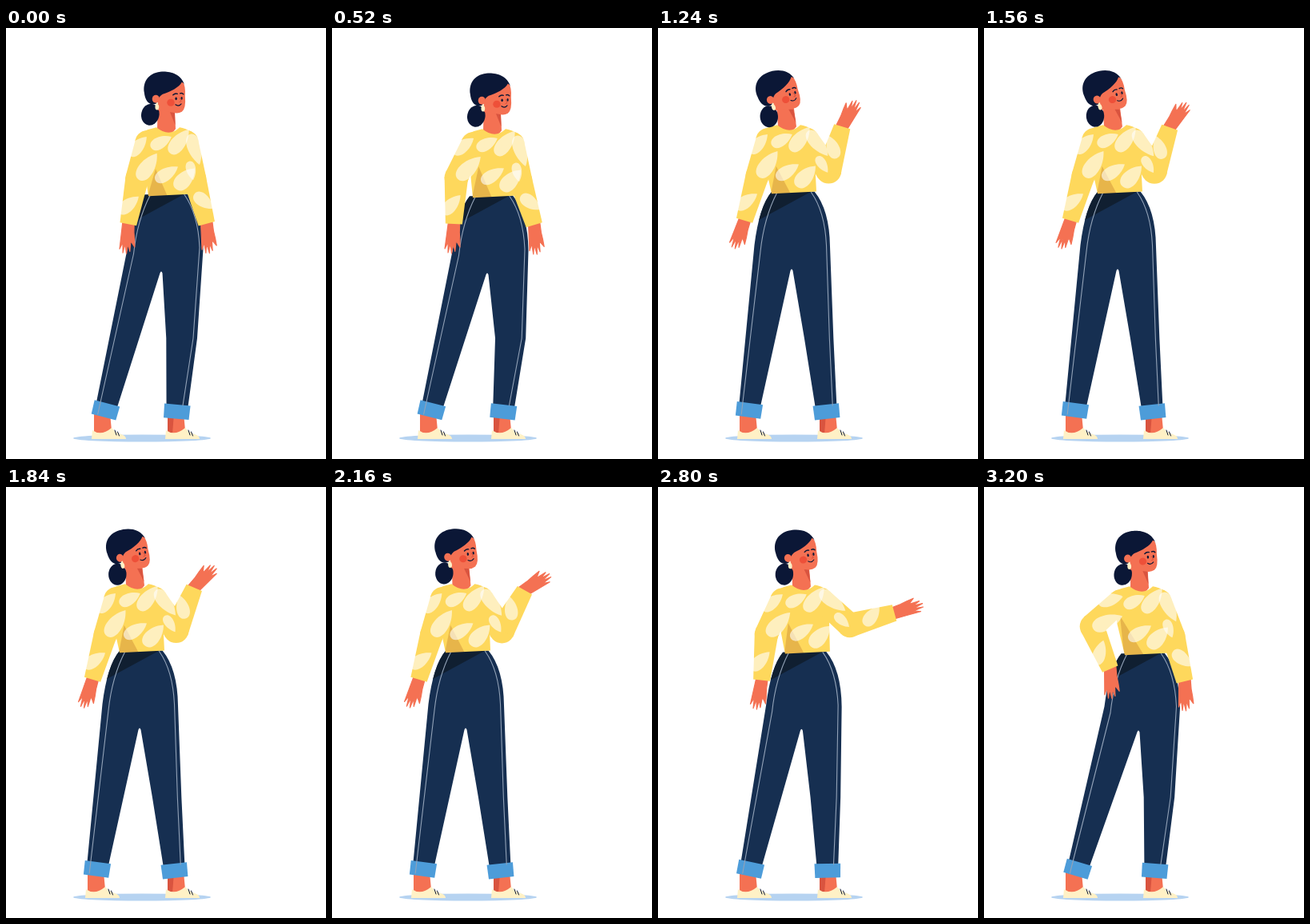
Write an HTML page with a canvas that moves like this. It is 400 by 539 pixels and loops after 3.32 s.

```html
<!DOCTYPE html>
<html lang="en">
<head>
<meta charset="utf-8">
<title>Waving woman</title>
<style>
  html, body { margin: 0; width: 100%; height: 100%; overflow: hidden; background: #fff; }
  canvas { display: block; }
</style>
</head>
<body>
<canvas id="stage" width="400" height="539"></canvas>
<script>
const W = 400, H = 539, LOOP = 3320, STEP = 40, RAD = Math.PI / 180;
const stage = document.getElementById('stage').getContext('2d');
const shirtCanvas = Object.assign(document.createElement('canvas'), { width: W, height: H });
const shirt = shirtCanvas.getContext('2d');

const SKIN = '#f47153', SKIN_DARK = '#d9543f', CHEEK = '#ee5039', HAIR = '#0b1736',
      YELLOW = '#fed85c', PANTS = '#162f51', PANTS_DARK = '#101f31', SEAM = '#93a3b8',
      CUFF = '#4d9cd9', SHOE = '#fff1c6', SHADOW = '#b6d3f1';

// time, chest x, hem x, hem y, crotch x, left foot x, knee bend, head tilt,
// left arm (upper, fore, hand), right arm (upper, fore, hand) in degrees
const KEYS = [
  [0,    202,   206, 208.5, 194, 107, 2.5, 0,   105, 101, 95,  78, 75,  86],
  [520,  202,   204, 210.5, 194, 107, 6,   0,   116, 93,  96,  78, 73,  86],
  [920,  165,   170, 206,   167, 99,  0,   -6,  105, 105, 97,  56, 52,  60],
  [1240, 163,   170, 205.5, 167, 99,  0,   -15, 106, 106, 110, 56, -73, -60],
  [1840, 163,   170, 205.5, 167, 99,  0,   -11, 106, 106, 108, 57, -67, -46],
  [2240, 163.5, 170, 205.5, 167, 99,  0,   -7,  106, 106, 109, 58, -60, -31],
  [2480, 163.5, 170, 205.5, 167, 99,  0,   -7,  106, 106, 109, 58, -60, -31],
  [2840, 183,   189, 207,   181, 99,  1,   -7,  116, 94,  100, 42, -8,  -14],
  [3200, 196,   204, 208.5, 193, 99,  2.5, -3,  138, 67,  88,  69, 76,  89]
];

const slope = (i, n) => KEYS[i] && KEYS[i + 1]
  ? (KEYS[i + 1][n] - KEYS[i][n]) / (KEYS[i + 1][0] - KEYS[i][0]) : 0;

function tangent(i, n) {
  const a = slope(i - 1, n), b = slope(i, n);
  return a * b > 0 ? 2 * a * b / (a + b) : 0;
}

// Smooth monotone curve through the keys
function poseAt(t) {
  let i = 0;
  while (i < KEYS.length - 2 && t >= KEYS[i + 1][0]) i++;
  const span = KEYS[i + 1][0] - KEYS[i][0], u = (t - KEYS[i][0]) / span, v = 1 - u;
  return KEYS[i].slice(1).map((from, j) => {
    const n = j + 1;
    return from * v * v * (1 + 2 * u) + KEYS[i + 1][n] * u * u * (3 - 2 * u)
      + span * u * v * (v * tangent(i, n) - u * tangent(i + 1, n));
  });
}

function fill(c, d, color) {
  c.fillStyle = color;
  c.fill(new Path2D(d));
}

function line(c, d, color, width) {
  c.strokeStyle = color;
  c.lineWidth = width;
  c.stroke(new Path2D(d));
}

function oval(c, x, y, rx, ry, color, turn = 0) {
  c.fillStyle = color;
  c.beginPath();
  c.ellipse(x, y, rx, ry, turn, 0, 7);
  c.fill();
}

function at(c, [x, y], angle, draw) {
  c.save();
  c.translate(x, y);
  c.rotate(angle * RAD);
  draw();
  c.restore();
}

const polar = ([x, y], angle, len) =>
  [x + len * Math.cos(angle * RAD), y + len * Math.sin(angle * RAD)];

function makeArm(shoulder, upper, fore, hand) {
  const elbow = polar(shoulder, upper, 47);
  return { shoulder, elbow, wrist: polar(elbow, fore, 58), upper, fore, hand,
    elbowR: 14.5 + 1.5 * Math.abs(Math.sin((fore - upper) / 2 * RAD)) };
}

function taper(c, a, ra, b, rb, angle) {
  const pts = [polar(a, angle - 90, ra), polar(b, angle - 90, rb),
               polar(b, angle + 90, rb), polar(a, angle + 90, ra)];
  fill(c, `M${pts.join('L')}Z`, YELLOW);
}

function drawSleeve(c, arm) {
  oval(c, ...arm.shoulder, 14.5, 14.5, YELLOW);
  oval(c, ...arm.elbow, arm.elbowR, arm.elbowR, YELLOW);
  taper(c, arm.shoulder, 14.5, arm.elbow, arm.elbowR, arm.upper);
  taper(c, arm.elbow, arm.elbowR, arm.wrist, 10.5, arm.fore);
}

function drawHand(arm) {
  const c = stage, d = `M-6 -7L10 -8L19 -9.5L28 -10.5L22 -6L23 -5L34 -5L25 -1.8
    L37 -1L25 1.8L36.5 3.5L23.5 4.8L32 8L14 7.5L-6 7Z`;
  at(c, arm.wrist, arm.hand, () => {
    fill(c, d, SKIN);
    line(c, d, SKIN, 1.2);
  });
}

function petal(origin, base, x, y, turn, len, wid) {
  at(shirt, origin, base, () => at(shirt, [x, y], turn, () =>
    fill(shirt, `M${len} 0C${len * .2} ${-wid * 1.4} ${-len} ${-wid * 1.3} ${-len} 0
      C${-len} ${wid * 1.3} ${len * .2} ${wid * 1.4} ${len} 0Z`, 'rgba(255,255,255,.6)')));
}

function drawShirt(chest, hem, left, right) {
  const c = shirt, [x, y] = chest, [hx, hy] = hem;
  c.clearRect(0, 0, W, H);
  fill(c, `M${x - 14} ${y}Q${x - 24} ${y + 2} ${x - 32} ${y + 6}L${x - 30} ${y + 45}
    L${hx - 28} ${hy + 1.8}L${hx + 28} ${hy - 1}L${x + 33} ${y + 45}L${x + 31} ${y + 6}
    Q${x + 22} ${y + 1} ${x + 15} ${y}Q${x + 2} ${y + 13} ${x - 14} ${y}Z`, YELLOW);
  c.globalCompositeOperation = 'source-atop';
  const w = (left.upper - 105) / 3;
  fill(c, `M${x - 15 - w} ${y + 52 - 1.4 * w}L${hx - 4} ${hy + 2}L${hx - 29} ${hy + 2}Z`,
    'rgba(205,140,50,.45)');
  c.globalCompositeOperation = 'source-over';
  drawSleeve(c, left);
  drawSleeve(c, right);

  c.globalCompositeOperation = 'source-atop';
  petal(chest, 0, -8, 18.5, -28, 14.5, 7.5);
  petal(chest, 0, 15, 17.5, -52, 19, 9);
  petal(chest, 0, -1, 58, -32, 16.5, 8);
  petal(chest, 0, 22, 64, -47, 17.5, 9.5);
  petal(left.shoulder, left.upper, 7.5, 9.5, -152, 16, 8);
  petal(left.shoulder, left.upper, 29, -9, -160, 20, 9.5);
  petal(left.elbow, left.fore, 34, 4, -140, 16, 8);
  petal(right.shoulder, right.upper, 11, -8, -5, 20, 8.5);
  petal(right.shoulder, right.upper, 36, 2, 0, 12, 6);
  petal(right.elbow, right.fore, 30, -4, -37, 15, 8);
  c.globalCompositeOperation = 'source-over';
  stage.drawImage(shirtCanvas, 0, 0);
}

function drawFoot(x, shaded) {
  const c = stage;
  at(c, [x, 0], 0, () => {
    fill(c, 'M3 482L23 482L25 503Q13 512 3 506Z', SKIN);
    if (shaded) fill(c, 'M3 482L11 482L9 508L3 506Z', SKIN_DARK);
    fill(c, 'M0 514L1 503Q12 511 25 500Q30 506 38 508.5Q43 510 43 514Z', SHOE);
    line(c, 'M29 503L31 509M32.5 505L34.5 510', HAIR, 1);
  });
}

function drawCuff(p, angle) {
  at(stage, p, angle, () => fill(stage, 'M-16.3 -9H16.3L15.8 8.7H-15.8Z', CUFF));
}

function drawLegs([hx, hy], crotch, foot, bend) {
  const c = stage, m = (hx + crotch) / 2, cy = hy + 96;
  const hipL = m - 48, hipR = m + 46.5;
  const leanL = (m - 27 - (foot + 17)) / 188;
  const kneeR = (m + 20 + 212) / 2 + bend + 1.5, leanR = (kneeR - 212) / 92;
  const cuffL = [foot + 12 + 20 * leanL, 478], cuffR = [212.3 + 14 * leanR, 480];
  const tiltL = Math.atan(leanL) / RAD, tiltR = Math.atan(leanR) / RAD;
  const [lo, li, ro, ri] = [[cuffL, tiltL, 180], [cuffL, tiltL, 0], [cuffR, tiltR, 0], [cuffR, tiltR, 180]]
    .map(([p, tilt, side]) => polar(p, tilt + side, 13));
  const innerKnee = (crotch + 1 + ri[0]) / 2 + bend, outerKnee = (hipR + ro[0]) / 2 + bend;

  drawFoot(foot, false);
  drawFoot(199, true);
  const shape = `M${m - 27} ${hy}Q${m - 42} ${hy + 18} ${hipL} ${hy + 66}L${lo}L${li}
    L${crotch - 1.5} ${cy + 2}Q${crotch} ${cy - 2} ${crotch + 1.5} ${cy + 2}
    L${innerKnee} 388L${ri}L${ro}L${outerKnee} 388L${hipR} ${hy + 68}
    Q${m + 46} ${hy + 22} ${m + 27} ${hy - 1}Z`;
  fill(c, shape, PANTS);
  c.save();
  c.clip(new Path2D(shape));
  fill(c, `M${m - 29} ${hy - 2}L${m + 25} ${hy - 2}L${m - 45} ${hy + 36}L${m - 60} ${hy}Z`, PANTS_DARK);
  c.restore();

  drawCuff(cuffL, tiltL);
  drawCuff(cuffR, tiltR);
  line(c, `M${m - 20} ${hy + 1}Q${m - 36} ${hy + 32} ${m - 40.5} ${hy + 74}
    L${cuffL[0] - 9.5} ${cuffL[1] + 5}`, SEAM, 1.1);
  line(c, `M${m + 23} ${hy}Q${m + 40} ${hy + 24} ${m + 42} ${hy + 66}
    L${outerKnee - 5} 388L${cuffR[0] + 7.5} 472`, SEAM, 1.1);
}

function drawNeck([x, y], [nx, ny]) {
  fill(stage, `M${nx - 11} ${ny - 12}L${nx + 10} ${ny - 12}L${x + 10} ${y + 2}Q${x + 2} ${y + 14}
    ${x - 13} ${y + 2}Z`, SKIN);
  fill(stage, `M${nx + 4} ${ny - 6}L${nx + 10} ${ny - 6}L${x + 9.5} ${y - 3}Z`, SKIN_DARK);
}

function drawHead(neck, tilt) {
  const c = stage;
  at(c, neck, tilt, () => {
    oval(c, -20.5, -2.5, 11.2, 13.5, HAIR, .2);
    fill(c, 'M-11 -30L20 -44Q24 -38 23 -26Q24.5 -10 19 -6Q14 -3 8 -5L-11 -8Z', SKIN);
    fill(c, `M23 -38C18 -56 0 -57 -8 -56C-24 -54 -30 -42 -28 -30C-27 -20 -22 -13 -13 -16
      C-11 -20 -10 -25 -5 -28C5 -31 16 -37 19 -43Q22 -42 23 -38Z`, HAIR);
    oval(c, -13.5, -22, 4.6, 5, SKIN);
    oval(c, -12, -16, 1.3, 1.3, SHOE);
    oval(c, -12, -12, 2.4, 3.6, SHOE);
    oval(c, 5.2, -17.5, 4.7, 4.5, CHEEK);
    oval(c, 11.8, -22.5, 1.2, 1.9, HAIR);
    oval(c, 18.8, -23, 1.1, 1.9, HAIR);
    line(c, 'M8 -27Q10.5 -29.5 13.5 -28.5M16.8 -29Q19.5 -30 21 -28', HAIR, 1.4);
    line(c, 'M16.3 -23.5L18.2 -19L16 -18.3', SKIN_DARK, 1);
    line(c, 'M11 -15Q15 -12 18.3 -16', HAIR, 1.1);
  });
}

function draw(t) {
  const [cx, hx, hy, crotch, foot, bend, tilt, l1, l2, l3, r1, r2, r3] = poseAt(t);
  const chest = [cx, hy - 84.2], hem = [hx, hy];
  const neck = [cx - 1.2 + tilt * .17, chest[1] - 13.5];
  const left = makeArm([cx - 26, chest[1] + 18.5], l1, l2, l3);
  const right = makeArm([cx + 24, chest[1] + 18.5], r1, r2, r3);

  stage.fillStyle = '#fff';
  stage.fillRect(0, 0, W, H);
  stage.lineCap = stage.lineJoin = 'round';
  oval(stage, 170, 513, 86, 4.5, SHADOW);
  drawLegs(hem, crotch, foot, bend);
  drawHand(left);
  drawHand(right);
  drawNeck(chest, neck);
  drawShirt(chest, hem, left, right);
  drawHead(neck, tilt);
}

const start = performance.now();
function tick() {
  const t = (performance.now() - start) % LOOP;
  draw(Math.min(Math.floor(t / STEP) * STEP, 3200));
  requestAnimationFrame(tick);
}
tick();
</script>
</body>
</html>
```
